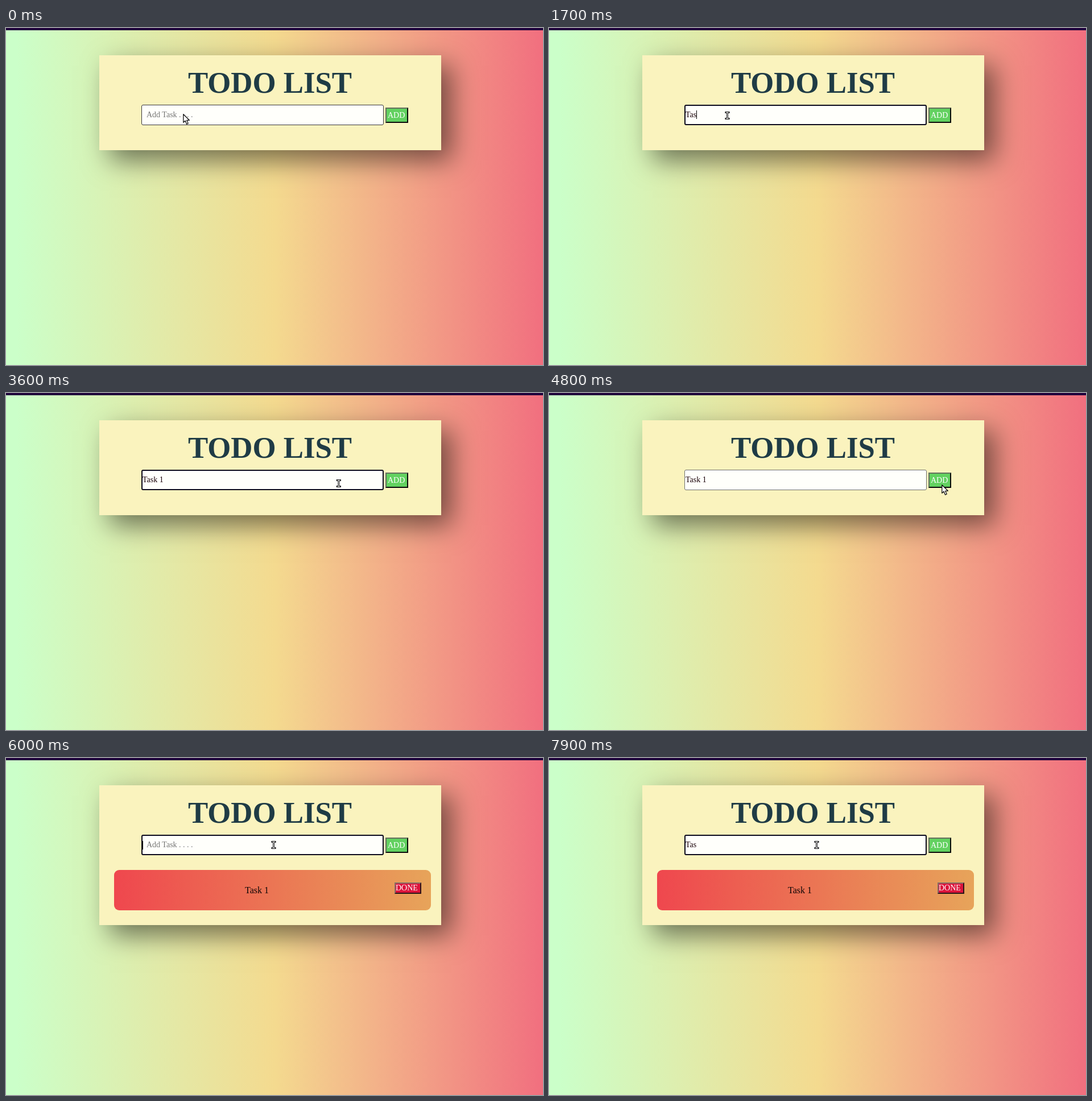
An HTML page for the animation above (8000 ms loop, 944 by 593 pixels).

```html
<!DOCTYPE html>
<html lang="en">
<head>
<meta charset="utf-8">
<title>Todo list</title>
<style>
  html, body { margin: 0; width: 100%; height: 100%; overflow: hidden; }
  body {
    position: relative;
    background: linear-gradient(90deg, #cbffc9 2%, #f4da8f 50%, #f16f7f 100%);
    font: 14px/15px "Liberation Serif", "Times New Roman", serif;
    cursor: default;
  }
  body * { position: absolute; box-sizing: border-box; white-space: pre; }
  #bar { left: 0; top: 0; width: 100%; height: 4px; background: #20003c; }
  #card {
    left: 164px; top: 48px; width: 600.5px; height: 166.5px;
    background: #faf3be;
    box-shadow: 17.5px 17.5px 44px rgba(0, 0, 0, .52);
  }
  #title {
    left: 164px; top: 67px; width: 600px; text-align: center;
    font-size: 52.8px; line-height: 58px; font-weight: bold; color: #1f3b45;
  }
  #field {
    left: 238px; top: 135px; width: 426px; height: 36px;
    background: #fffffb; border: 1px solid #6f6f70; border-radius: 3px;
  }
  #field.hover { border-color: #38383d; }
  #field.focus { border: 2px solid #0c0a1c; }
  #hint { left: 247px; top: 145px; color: #757575; }
  #line { left: 240px; top: 145px; color: #1a0008; }
  #line span, #caret { position: static; }
  #line.empty { top: 146px; }
  #caret {
    display: inline-block; width: 1px; height: 15px; margin-right: -1px;
    vertical-align: top; background: #000;
  }
  .btn { border: 2px solid; border-color: #66705f #0a0a0a #0a0a0a #66705f; color: #fff; }
  .btn.down { border-color: #0a0a0a #66705f #66705f #0a0a0a; }
  #add { left: 667px; top: 140px; width: 39.5px; height: 26.5px; padding: 4px 2px; background: #62d160; }
  #item {
    left: 190px; top: 197px; width: 557px; height: 70.5px; border-radius: 9px;
    background: linear-gradient(90deg, #ef474e, #e7a45a);
  }
  #task { left: 230px; top: 27px; font-size: 16px; line-height: 17px; color: #0d0505; }
  #done {
    left: 493px; top: 22px; width: 46.5px; height: 19.5px; background: #dc143c;
    border-color: #857068 #2a1518 #2a1518 #857068;
  }
  svg { left: 0; top: 0; overflow: visible; }
</style>
</head>
<body>
<div id="bar"></div>
<div id="card"></div>
<div id="title">TODO LIST</div>
<div id="field"></div>
<div id="hint">Add Task . . . .</div>
<div id="line"><span id="typed"></span><i id="caret"></i></div>
<div id="add" class="btn">ADD</div>
<div id="item">
  <div id="task">Task 1</div>
  <div id="done" class="btn">DONE</div>
</div>
<svg id="arrow" width="14" height="20">
  <path d="M.8 .8V15.2L4.1 12.2L6.6 18.2L9.2 17L6.7 11.3H11.3Z" fill="#fff" stroke="#111" stroke-width="1.3" stroke-linejoin="round"/>
</svg>
<svg id="beam" width="8" height="14" fill="none">
  <path d="M-2.5 -5.5H2.5M-2.5 5.5H2.5M0 -5.5V5.5" stroke="#111" stroke-width="3" stroke-linecap="square"/>
  <path d="M-2.5 -5.5H2.5M-2.5 5.5H2.5M0 -5.5V5.5" stroke="#fff" stroke-width="1"/>
</svg>
<script>
const LOOP = 8000, TICK = 100;
const $ = id => document.getElementById(id);

// Each step lists only what changes at its time.
const steps = [
  [0, { text: "", focus: false, caret: false, down: false, added: false }],
  [500, { focus: true, caret: true }],
  [1100, { caret: false }],
  [1400, { text: "T", caret: true }],
  [1600, { text: "Ta" }],
  [1700, { text: "Tas" }],
  [2100, { text: "Task" }],
  [2400, { text: "Task " }],
  [2700, { text: "Task 1" }],
  [3300, { caret: false }],
  [3900, { caret: true }],
  [4500, { focus: false, caret: false, down: true }],
  [4800, { down: false }],
  [5000, { text: "", added: true }],
  [6000, { focus: true, caret: true }],
  [6500, { caret: false }],
  [6800, { text: "T", caret: true }],
  [7100, { text: "Ta" }],
  [7200, { text: "Tas" }],
  [7900, { caret: false }]
];

// Pointer moves: start, end, from, to, ease-out power.
const moves = [
  [0, 100, [311, 151], [313.5, 154], 1],
  [3200, 4100, [313.5, 154], [690, 161], 2.17],
  [5200, 5700, [690, 161], [470.5, 153], 2]
];

function pointer(t) {
  let [start, end, from, to, power] = moves.filter(m => m[0] <= t).pop();
  const p = Math.min(1, (t - start) / (end - start));
  const k = 1 - Math.pow(1 - p, power);
  return from.map((v, i) => v + (to[i] - v) * k);
}

const show = (id, on) => $(id).style.visibility = on ? "visible" : "hidden";

function render(time) {
  const t = Math.floor(time % LOOP / TICK) * TICK;
  const s = Object.assign({}, ...steps.filter(e => e[0] <= t).map(e => e[1]));
  const [x, y] = pointer(t);
  const overField = x < 664;
  const beam = overField && t >= 100;

  $("typed").textContent = s.text;
  $("line").className = s.text ? "" : "empty";
  $("field").className = s.focus ? "focus" : overField ? "hover" : "";
  $("add").className = s.down ? "btn down" : "btn";
  $("card").style.height = s.added ? "245.5px" : "166.5px";
  show("hint", !s.text);
  show("caret", s.caret);
  show("item", s.added);
  show("beam", beam);
  show("arrow", !beam);
  $(beam ? "beam" : "arrow").style.transform = `translate(${x}px, ${y}px)`;
}

function frame() {
  render(performance.now());
  requestAnimationFrame(frame);
}
frame();
</script>
</body>
</html>
```
